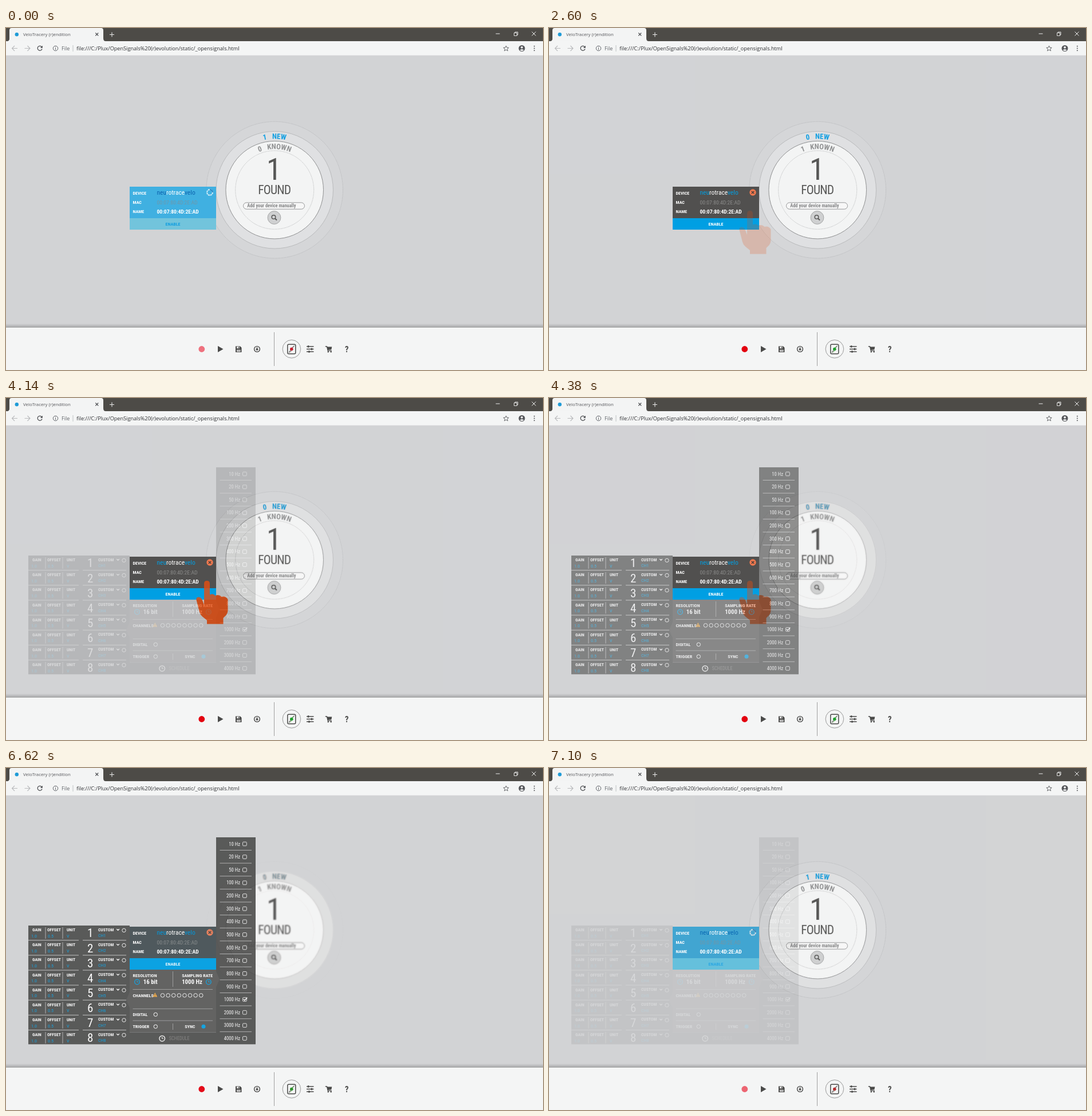
Recreate the animation shown at these times as an HTML page. Size 938x597 px, loop 7.16 s.

```html
<!DOCTYPE html>
<html lang="en">
<head>
<meta charset="utf-8">
<title>Device setup</title>
<style>
html, body { margin: 0; width: 100%; height: 100%; overflow: hidden; background: #d2d3d5; }
svg { display: block; width: 100vw; height: 100vh; }
text { font-family: "Roboto Condensed", Roboto, "Open Sans", sans-serif; font-stretch: 75%; white-space: pre; }
.ui text { font-family: "Open Sans", "Noto Sans", sans-serif; font-stretch: 100%; }
.soft { filter: grayscale(1) blur(1.1px); }
</style>
</head>
<body>
<svg id="stage" viewBox="0 0 938 597" preserveAspectRatio="none"></svg>
<script>
const DARK = '#4d4d4c', INK = '#575756', BLUE = '#009fe3', WHITE = '#fff';
const CX = 469.2, CY = 282.7;

// Slightly smaller type if no condensed face is available
const probe = document.createElement('canvas').getContext('2d');
probe.font = 'bold condensed 100px "Roboto Condensed", Roboto, "Open Sans", sans-serif';
const fit = probe.measureText('FOUND').width > 310 ? 0.88 : 1;

const rect = (x, y, w, h, fill, extra = '') =>
  `<rect x="${x}" y="${y}" width="${w}" height="${h}" fill="${fill}" ${extra}/>`;
const ring = (x, y, r, stroke, w = 1, fill = 'none', extra = '') =>
  `<circle cx="${x}" cy="${y}" r="${r}" fill="${fill}" stroke="${stroke}" stroke-width="${w}" ${extra}/>`;
const dot = (x, y, r, fill) => `<circle cx="${x}" cy="${y}" r="${r}" fill="${fill}"/>`;
const line = (d, stroke, w = 1, extra = '') =>
  `<path d="${d}" fill="none" stroke="${stroke}" stroke-width="${w}" ${extra}/>`;
const shape = (d, fill) => `<path d="${d}" fill="${fill}"/>`;
// y is the middle of the capitals
const label = (x, y, s, size, fill = WHITE, weight = 700, anchor = 'start', extra = '') =>
  `<text x="${x}" y="${y + size * fit * 0.355}" font-size="${size * fit}" fill="${fill}" font-weight="${weight}" text-anchor="${anchor}" ${extra}>${s}</text>`;
const plain = (x, y, s, size, fill) =>
  `<text x="${x}" y="${y + size * 0.36}" font-size="${size}" fill="${fill}">${s}</text>`;
const repeat = (n, fn) => Array.from({ length: n }, (_, i) => fn(i)).join('');

function browser() {
  const g = '#5f6368';
  return `<g class="ui">` +
    rect(0, 0, 938, 24, '#4d4b47') +
    shape('M0 23H2Q6 23 6 18V4Q6 0 10 0H166Q170 0 170 4V18Q170 23 174 23V24H0Z', '#f3f4f4') +
    shape('M0 0H6V18Q6 23 0 23Z', '#4d4b47') +
    rect(0, 23, 938, 25, '#f4f5f5') +
    line('M0 47.7H938', '#e0e1e2', 0.6) +
    dot(18.8, 11.3, 3.2, '#1f9bd7') +
    plain(30, 11.2, 'VeloTracery (r)endition', 7.9, '#55565a') +
    line('M156.3 8.5l5 5m0-5l-5 5', '#4b4c50', 1.1) +
    line('M181 11.5h8m-4-4v8', '#e8e8e8', 1.1) +
    line('M855.5 10h7', '#eee') +
    line('M887.5 8.5h5v5h-5zM889 8.500v-1.500h5v5h-1.500', '#eee', 0.9) +
    line('M918.5 6.500l7 7m0-7l-7 7', '#eee') +
    line('M20 35.500H10.500m4.500-4.500l-4.500 4.500l4.500 4.500', '#b9babc', 1.1) +
    line('M32.500 35.500H42m-4.500-4.500l4.500 4.500l-4.500 4.500', '#b9babc', 1.1) +
    line('M62.300 32.800A4 4 0 1 0 63 36.500', '#45474a', 1.2) +
    shape('M63.800 30.800v4h-4z', '#45474a') +
    ring(86.500, 35.500, 4.200, g, 1) + line('M86.500 35v3M86.500 33v1.100', g, 1) +
    plain(97, 35.400, 'File', 9, g) +
    line('M117 30v11', '#b4b6b8', 0.8) +
    plain(123.300, 35.400, 'file:///C:/Plux/OpenSignals%20(r)evolution/static/_opensignals.html', 9.150, '#303134') +
    line('M873.500 31l1.300 3.100l3.400.300l-2.600 2.200l.800 3.300l-2.900-1.800l-2.900 1.800l.800-3.300l-2.600-2.200l3.400-.300z', '#55565a', 0.9) +
    dot(901, 35.500, 5.500, '#55565a') + dot(901, 33.800, 1.900, '#f4f5f5') +
    shape('M897.500 38.500Q901 35.500 904.500 38.500Q901 41.500 897.500 38.500Z', '#f4f5f5') +
    repeat(3, i => dot(922.800, 31.800 + i * 3.700, 1, '#55565a')) + `</g>`;
}

function toolbar(live) {
  const k = '#4a4a49';
  return rect(0, 516, 938, 7, 'url(#shade)') + rect(0, 523, 938, 74, '#f4f5f5') +
    line('M0 522.500H938', '#a3a4a5') +
    dot(341.800, 560.500, 5.400, live ? '#e3000f' : '#ee717e') +
    shape('M370 555l9.500 5.500l-9.500 5.500z', k) +
    shape('M401 555.500h8l2.500 2.500v8h-10.500z', k) +
    rect(403, 556.300, 4.800, 3, '#f4f5f5') + rect(403, 561.800, 6.500, 3.200, '#f4f5f5') +
    rect(405.800, 556.700, 1.300, 2.200, k) + line('M403.500 563.400h5.500', k, 0.8) +
    ring(438.500, 560.500, 4.900, k, 1.400) + line('M438.500 557.500v3.500', k, 1.700) +
    shape('M435.700 560.300h5.600l-2.800 3.200z', k) +
    line('M468.500 531V590', '#a0a0a0') +
    ring(498.900, 560.300, 15.800, '#8d8d8d', 0.9) +
    rect(491.800, 552.300, 14, 16.400, '#f4f5f5', `rx="2" stroke="${k}" stroke-width="1.500"`) +
    line('M503.500 554.500L499.500 559.500M498 561.500L494 566.500', k, 1.100) +
    line('M502.500 555.500l-6.500 5.500h5.500l-6 5.500', live ? '#5a9f4a' : '#8b6a6c', 0.9) +
    dot(498.800, 560.500, 2.700, live ? '#1fa12e' : '#c8202f') +
    line('M525 556h12.500M525 560.500h12.500M525 565h12.500', k, 1.300) +
    rect(527, 554.300, 2.300, 3.400, k) + rect(532.800, 558.800, 2.300, 3.400, k) + rect(528.300, 563.300, 2.300, 3.400, k) +
    line('M557.800 556h2.700l1.800 7.300h6.500', k, 1.300) +
    shape('M560.500 556.500h8.800l-1 5l-6.700.800z', k) + dot(562.800, 565.300, 1.200, k) + dot(567.700, 565.300, 1.200, k) +
    label(595.300, 560.600, '?', 14.500, k, 900, 'middle');
}

function finder(fresh, known, blurred) {
  const edge = blurred ? '#c6c7c9' : '#8f9091';
  const arc = (id, s, fill) =>
    `<text font-size="${13 * fit}" font-weight="700" fill="${fill}" text-anchor="middle"><textPath href="#${id}" startOffset="50%">${s}</textPath></text>`;
  return `<g ${blurred ? 'class="soft"' : ''}>` +
    ring(CX, CY, 119.300, blurred ? 'none' : '#b3b4b6', 0.8, blurred ? 'none' : '#d5d6d8', 'stroke-dasharray="1.500 1"') +
    ring(CX, CY, 102.300, blurred ? 'none' : '#b0b1b3', 0.8, '#dfe0e2') +
    ring(CX, CY, 85.300, edge, 1, '#f3f4f4') +
    ring(CX, CY, 68.500, blurred ? '#e6e7e8' : '#b2b3b4', 0.8, 'none', 'stroke-dasharray="1.500 1"') +
    arc('arcNew', `${fresh}\u00a0\u00a0 NEW`, blurred ? '#8b8c8d' : '#14a0e2') +
    arc('arcKnown', `${known}\u00a0\u00a0 KNOWN`, '#929394') +
    label(468, 246, '1', 53, INK, 400, 'middle') +
    label(468.800, 282.700, 'FOUND', 21.500, INK, 400, 'middle', 'letter-spacing="-.8"') +
    rect(414.500, 304.800, 107, 11.400, '#f7f7f7', 'rx="5.700" stroke="#8d8e8f" stroke-width=".9"') +
    label(421.300, 310.400, 'Add your device manually', 8.300, '#858687') +
    ring(468.500, 331, 11.400, '#9c9d9e', 0.9, '#cfd0d1') +
    ring(467.500, 330, 3.300, INK, 1.500) + line('M470 332.500l3 3', INK, 1.900) + `</g>`;
}

function card(busy) {
  const a = busy ? '#0b62ae' : BLUE;
  return rect(216, 277, 151, 55, busy ? '#40b0e1' : '#51504f') +
    rect(216, 332, 151, 20, busy ? '#72c4dc' : BLUE) +
    label(221.500, 287.800, 'DEVICE', 8) + label(221.500, 304, 'MAC', 8) + label(221.500, 320.500, 'NAME', 8) +
    label(263.500, 286.800, `<tspan fill="${a}">neu</tspan>rotrace<tspan fill="${a}">velo</tspan>`, 11.500, WHITE, 400) +
    label(263.500, 304.600, '00:07:80:4D:2E:AD', 9.700, busy ? '#7097a9' : '#8b8b8a', 400) +
    label(263.500, 320.800, '00:07:80:4D:2E:AD', 9.600) +
    label(291.500, 341.800, 'ENABLE', 8, busy ? '#129ee0' : WHITE, 700, 'middle') +
    (busy
      ? ring(356, 287, 4.900, '#dff2fb', 2.100, 'none', 'stroke-dasharray="3 .850" opacity=".9"') +
        line('M356 282.100A4.900 4.900 0 0 1 360.900 287', '#2a86c2', 2.100)
      : dot(356, 287, 5.700, '#f0794f') + line('M353.700 284.700l4.600 4.600m0-4.600l-4.600 4.600', '#51403a', 1.500));
}

function channel(i) {
  const y = 275 + i * 26.120;
  const cell = (x, name, value, vx) =>
    label(x, y + 7.500, name, 7.600) + label(vx, y + 18, value, 8, BLUE, 400);
  return cell(46, 'GAIN', '1.0', 44) + cell(72, 'OFFSET', '0.5', 73) + cell(106, 'UNIT', 'V', 106) +
    line(`M69 ${y + 3}v20M99 ${y + 3}v20`, '#c9c9c9', 0.8) +
    label(147.300, y + 13, i + 1, 21, WHITE, 400, 'middle') +
    label(161, y + 7, 'CUSTOM', 7.600) + label(161, y + 17.300, 'CH' + (i + 1), 8, BLUE, 400) +
    line(`M193.300 ${y + 6}l2.300 2.300l2.300-2.300`, WHITE, 1.300) + ring(206, y + 8.400, 3.200, WHITE, 0.9) +
    (i < 7 ? line(`M39 ${y + 25.700}h88M134 ${y + 25.700}h76`, '#dcdcdc', 0.8) : '');
}

function rate(hz, i) {
  const y = 132.500 + i * 22.630;
  return label(409, y, hz + ' Hz', 8.700, WHITE, 400, 'end') +
    rect(413.500, y - 3.300, 6.800, 6.600, 'none', 'rx="1.200" stroke="#f0f0f0" stroke-width=".9"') +
    (hz === 1000 ? line(`M414.800 ${y - 0.500}l2 2.200l4.500-5`, WHITE, 1.400) : '') +
    (i < 15 ? line(`M373.500 ${y + 11}H429`, '#c4c4c4', 0.8) : '');
}

function settings() {
  const rates = [10, 20, 50, 100, 200, 300, 400, 500, 600, 700, 800, 900, 1000, 2000, 3000, 4000];
  const body = '#575756';
  const clock = (x, y, r, c) => ring(x, y, r, c, 1.300) + line(`M${x} ${y - r * 0.600}v${r * 0.600}h${r * 0.450}`, c);
  return rect(39, 275, 177, 207.300, DARK) + repeat(8, channel) +
    rect(367, 121, 69, 361.300, DARK) + rates.map(rate).join('') +
    rect(216, 352, 151, 109.500, body) + rect(216, 461.500, 151, 20.800, DARK) +
    shape('M367 355l6 13.800l-6 13.800zM216 391l-6 13.800l6 13.800z', body) +
    label(221.500, 362.300, 'RESOLUTION', 8) + label(361.300, 362.300, 'SAMPLING RATE', 8, WHITE, 700, 'end') +
    clock(229, 373.500, 4.300, BLUE) + label(239.800, 373.300, '16 bit', 10.800) +
    label(343, 373.300, '1000 Hz', 10.800, WHITE, 700, 'end') + clock(353.800, 373.500, 4.300, BLUE) +
    line('M291.500 355v27M291.500 446v11', '#a9a9a9', 0.8) +
    line('M221.500 386.500H361M221.500 420.300H361M221.500 441H361', '#a9a9a9', 0.8) +
    label(221.500, 396.700, 'CHANNELS', 8) +
    shape('M260.300 392l4 7.400h-8z', '#f4a73c') + line('M260.300 394.500v2.300m0 .9v1', body, 0.9) +
    repeat(8, i => ring(273.500 + i * 9.600, 396.900, 3.300, WHITE, 0.9)) +
    label(221.500, 430.300, 'DIGITAL', 8) + ring(261.300, 430.300, 3.200, WHITE) +
    label(221.500, 451.300, 'TRIGGER', 8) + ring(261.300, 451.300, 3.200, WHITE) +
    label(312.300, 451.300, 'SYNC', 8) + dot(345, 451.300, 3.500, BLUE) +
    clock(272.700, 472.200, 4.800, WHITE) + label(284.800, 472, 'SCHEDULE', 8.300, '#7d7d7c', 400);
}

const hand = () => shape('M346 324Q346 319 351 319Q356 319 356 324V343.500Q362 340.500 365.500 345Q372 342 376.500 347' +
  'Q383.500 345 387.500 351.500V371Q387 377 383 380.500L379.500 384V394.500H351V388L343 381.500Q339 378 337.800 373' +
  'L332.400 352Q332 348 336 347.500Q341 347 343.300 354L346 361Z', '#e84e0f');

const scene = (id, live, ...parts) =>
  `<g id="${id}">` + rect(0, 48, 938, 549, '#d2d3d5') + parts.join('') + toolbar(live) + `</g>`;
const arcPath = (id, r) => `<path id="${id}" d="M${CX - r} ${CY}A${r} ${r} 0 0 1 ${CX + r} ${CY}"/>`;

document.getElementById('stage').innerHTML =
  `<defs>${arcPath('arcNew', 89.300)}${arcPath('arcKnown', 71.500)}
  <linearGradient id="shade" x2="0" y2="1"><stop stop-opacity="0"/><stop offset="1" stop-opacity=".220"/></linearGradient></defs>` +
  scene('found', false, finder(1, 0), card(true)) +
  scene('known', true, finder(0, 1), card(false)) +
  scene('press', true, finder(0, 1), card(false), hand()) +
  scene('setup', true, finder(0, 1, true), card(false), settings()) +
  browser();

const LOOP = 7160, STEP = 60;
const fade = (t, start) => Math.min(10, Math.max(0, Math.floor((t - start) / STEP) + 1)) / 10;
const show = (id, a) => {
  const el = document.getElementById(id);
  el.setAttribute('opacity', a);
  el.style.display = a ? '' : 'none';
};

function draw() {
  const t = performance.now() % LOOP;
  const closing = fade(t, 6620);
  show('known', closing ? 0 : fade(t, 1000));
  show('press', closing ? 0 : fade(t, 2540));
  show('setup', fade(t, 4080) * (1 - closing));
  requestAnimationFrame(draw);
}
draw();
</script>
</body>
</html>
```
